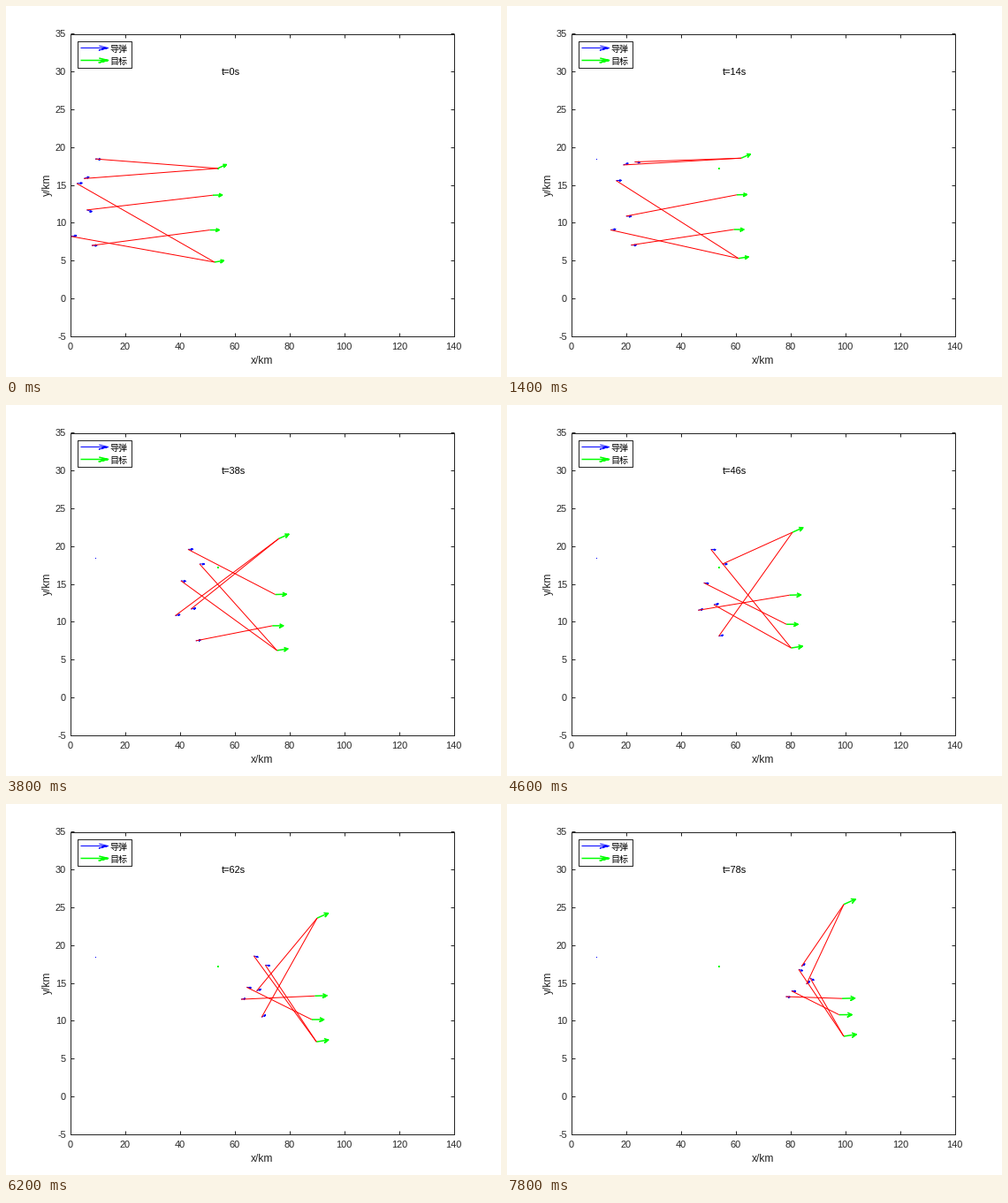
A matplotlib script that plays this animation: 560x420 px, repeating every 8000 ms.

```python
import numpy as np
import matplotlib.pyplot as plt
from matplotlib.animation import FuncAnimation

W, H, DPI = 560, 420, 100
PX = 72 / DPI                                  # one pixel in points
LEFT, RIGHT = 0.13 * W, 0.905 * W              # plot box in pixels
TOP, BOTTOM = 0.075 * H, 0.89 * H
SCALE = np.array([(RIGHT - LEFT) / 140, (TOP - BOTTOM) / 40])   # pixels per km
INK, BLUE, GREEN, RED = "#262626", "#0000ff", "#00ff00", "#ff0000"
STEP, FRAMES, INTERVAL = 2, 40, 200
END = STEP * (FRAMES - 1)


def px(x, y):
    """Pixel position of a point given in km."""
    return np.array([LEFT, BOTTOM]) + SCALE * (x, y + 5)


class Track:
    """Steady flight in x; y is the polynomial through evenly spaced heights."""

    def __init__(self, x0, speed, *heights):
        self.x0, self.speed = x0, speed
        times = np.linspace(0, END, len(heights))
        self.curve = np.polyfit(times, heights, len(heights) - 1)

    def pos(self, t):
        return px(self.x0 + self.speed * t, np.polyval(self.curve, t))

    def heading(self, t):
        climb = np.polyval(np.polyder(self.curve), t)
        v = SCALE * (self.speed, climb)
        return v / np.hypot(*v)


MISSILES = [
    Track(9.15, 1, 18.45, 17.9, 17.65, 17.5, 15.65),
    Track(4.95, 1, 15.85, 18.3, 19.6, 18.9, 16.8),
    Track(2.35, 1, 15.2, 15.65, 15.4, 14.6, 13.95),
    Track(6.0, 1, 11.7, 10.9, 11.75, 13.5, 17.2),
    Track(0.3, 1, 8.2, 9.4, 10.9, 12.6, 13.2),
    Track(7.8, 1, 7.0, 7.05, 7.55, 9.8, 14.85),
]
TARGETS = {
    "A": Track(53.8, 0.585, 17.2, 21.1, 25.4),
    "B": Track(52.0, 0.6, 13.65, 13.6, 12.95),
    "C": Track(50.9, 0.6, 9.05, 9.5, 10.8),
    "D": Track(52.6, 0.6, 4.8, 6.25, 7.95),
}
# Which target each missile is paired with, from a given second on
PLANS = [(0, "AADBDC"), (20, "DBDAAC"), (40, "ADCDBA"), (50, "DDCABA")]


def arrow(tail, head, length, half=0.17, barb=0.33):
    """Open arrow as one polyline: shaft, then both barbs."""
    tip = tail + head * length
    back = tip - head * length * barb
    side = np.array([-head[1], head[0]]) * length * half
    return np.array([tail, tip, back + side, tip, back - side]).T


fig = plt.figure(figsize=(W / DPI, H / DPI), dpi=DPI, facecolor="white")
ax = fig.add_axes([0, 0, 1, 1])
ax.set_xlim(0, W)
ax.set_ylim(H, 0)
ax.axis("off")


def line(xs, ys, color, width=1.0, z=2):
    return ax.plot(xs, ys, color=color, lw=width * PX, zorder=z,
                   solid_capstyle="butt", solid_joinstyle="round")[0]


def box(x0, y0, x1, y1):
    line([x0, x1, x1, x0, x0], [y0, y0, y1, y1, y0], INK)


def label(x, y, s, size=11, color=INK, font="Liberation Sans", **kw):
    return ax.text(x, y, s, fontsize=size * PX, color=color, family=font,
                   va="baseline", zorder=6, **kw)


def draw_axes():
    box(LEFT, TOP, RIGHT, BOTTOM)
    for v in range(0, 141, 20):
        x = px(v, 0)[0]
        line([x, x], [BOTTOM, BOTTOM - 4.3], INK)
        line([x, x], [TOP, TOP + 4.3], INK)
        label(x, 389, str(v), ha="center")
    for v in range(-5, 36, 5):
        y = px(0, v)[1]
        line([LEFT, LEFT + 4.3], [y, y], INK)
        line([RIGHT, RIGHT - 4.3], [y, y], INK)
        label(LEFT - 4.8, y + 4, str(v), ha="right")
    label((LEFT + RIGHT) / 2, 405, "x/km", 12, ha="center")
    label(49.5, (TOP + BOTTOM) / 2, "y/km", 12, ha="center",
          rotation=90, rotation_mode="anchor")


def draw_legend():
    box(80.5, 39.5, 141.5, 69.5)
    east = np.array([1.0, 0.0])
    for y, color, width, name in [(47.5, BLUE, 1, "导弹"), (61.5, GREEN, 1.5, "目标")]:
        line(*arrow(np.array([84.5, y]), east, 31, half=0.08), color, width)
        label(117.5, y + 4.3, name, 10, "black", "Noto Sans CJK JP")


draw_axes()
draw_legend()

# Marks left at two starting points
for path, color, size in [(MISSILES[0], BLUE, 1), (TARGETS["A"], GREEN, 2)]:
    ax.plot(*path.pos(0), "s", color=color, ms=size * PX, mew=0, zorder=2)

shots = [line([], [], BLUE, 1, 3) for _ in MISSILES]
goals = {k: line([], [], GREEN, 1.5, 3) for k in TARGETS}
links = [line([], [], RED, 1, 4) for _ in MISSILES]
clock = label(px(55, 0)[0], 78, "", color="black")


def update(i):
    t = i * STEP
    plan = [p for start, p in PLANS if start <= t][-1]
    for k, path in TARGETS.items():
        # targets keep pointing along their first heading
        goals[k].set_data(*arrow(path.pos(t), path.heading(0), 10.5 + t / 20))
    for path, k, shot, link in zip(MISSILES, plan, shots, links):
        start = path.pos(t)
        shot.set_data(*arrow(start, path.heading(t), 6 - t / 60))
        link.set_data(*zip(start, TARGETS[k].pos(t)))
    clock.set_text(f"t={t}s")
    return [*shots, *goals.values(), *links, clock]


anim = FuncAnimation(fig, update, frames=FRAMES, interval=INTERVAL,
                     repeat=True, repeat_delay=0, blit=False)
plt.show()
```
